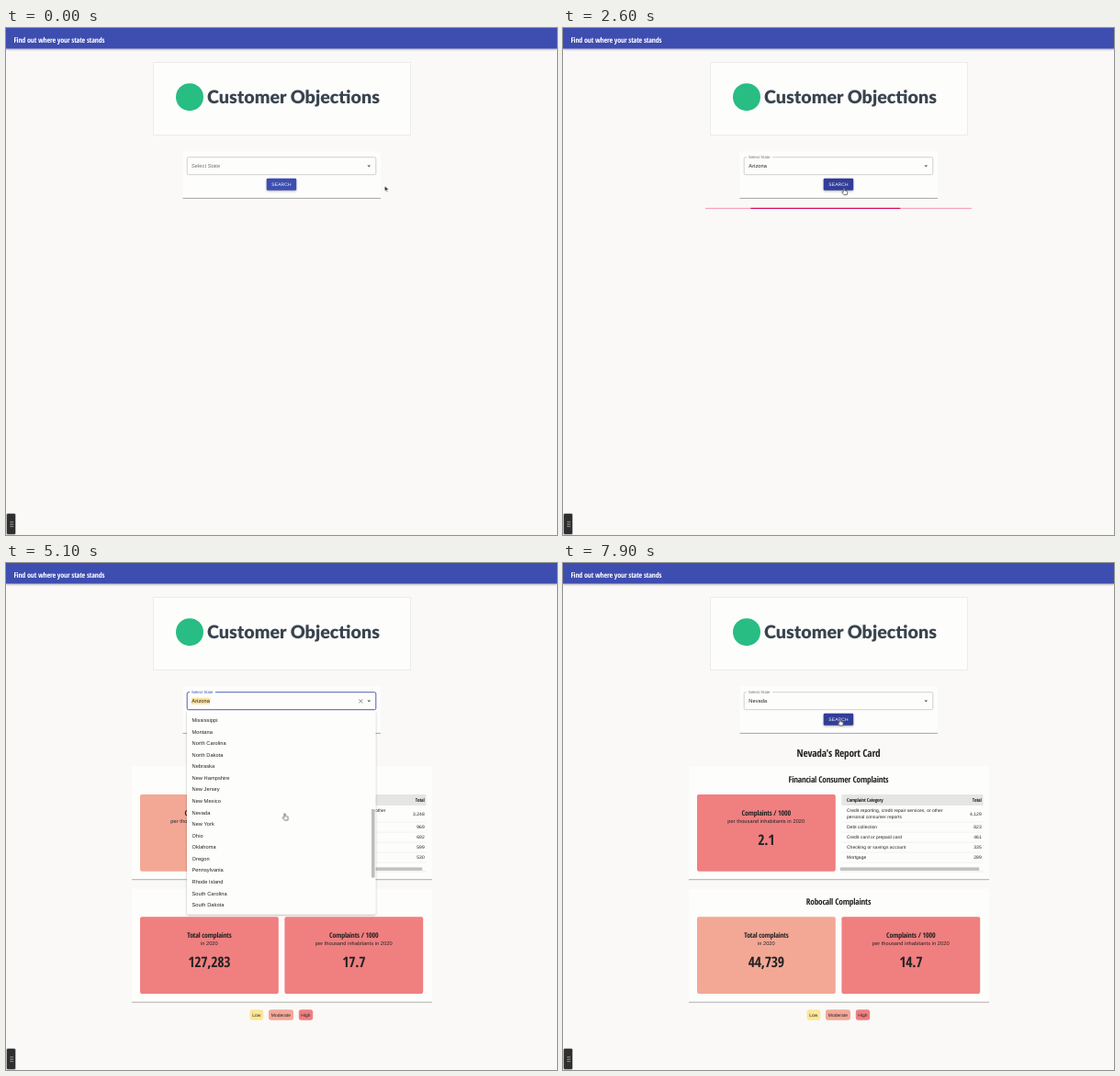
An HTML page for the animation above (8000 ms loop, 600x552 px).

```html
<!DOCTYPE html>
<html lang="en">
<head>
<meta charset="utf-8">
<title>State report card</title>
<style>
:root { --k: 1; --blue: #3d4db0; }
html, body { margin: 0; width: 100%; height: 100%; overflow: hidden; background: #faf9f8; }
svg { display: block; }
text { font: 5.66px "Liberation Sans", Arial, sans-serif; letter-spacing: .01em; fill: #222; text-rendering: geometricPrecision; }
.small { font-size: 4.95px; }
.tiny { font-size: 4.25px; }
.mid { text-anchor: middle; }
.end { text-anchor: end; }
.brand { font: 900 19.7px Lato, sans-serif; letter-spacing: 0; fill: #39444f; }

/* Narrow headings; --k evens out the widths of the available faces */
.thin, .head {
  font-family: Oswald, "Open Sans Condensed", "Roboto Condensed", "Open Sans", sans-serif;
  font-stretch: 75%; font-weight: 300; letter-spacing: -.02em;
  font-size: calc(var(--size) * var(--k));
}
.head { font-weight: 400; }

/* Visibility of the parts over one loop */
.empty, .idle, .focus, .clear, .caret, .marked, .first, .second, .menu, .resultA, .resultB, .load,
.arrow, .hand, .beam { animation: 8s step-end infinite; }
.empty { animation-name: empty; }
.idle { animation-name: idle; }
.focus { animation-name: focus; }
.clear { animation-name: clear; }
.caret { animation-name: caret; }
.marked { animation-name: marked; }
.first { animation-name: first; }
.second { animation-name: second; }
.menu { animation-name: menu; }
.resultA { animation-name: resultA; }
.resultB { animation-name: resultB; }
.load { animation-name: load; animation-delay: var(--at); }
.arrow { animation-name: arrow; }
.hand { animation-name: hand; }
.beam { animation-name: beam; }
@keyframes empty { 0% { visibility: visible } 7.5%, 100% { visibility: hidden } }
@keyframes idle { 0%, 48.75% { visibility: hidden } 26.875%, 88.125%, 100% { visibility: visible } }
@keyframes focus { 0%, 26.875%, 88.125%, 100% { visibility: hidden } 7.5%, 48.75% { visibility: visible } }
@keyframes clear { 0%, 26.875%, 88.125%, 100% { visibility: hidden } 20%, 48.75% { visibility: visible } }
@keyframes caret { 0%, 26.875%, 88.125%, 100% { visibility: hidden } 20%, 70% { visibility: visible } }
@keyframes marked { 0%, 70%, 100% { visibility: hidden } 48.75% { visibility: visible } }
@keyframes first { 0%, 70%, 100% { visibility: hidden } 20% { visibility: visible } }
@keyframes second { 0% { visibility: hidden } 70%, 100% { visibility: visible } }
@keyframes menu { 0%, 20%, 70%, 100% { visibility: hidden } 7.5%, 48.75% { visibility: visible } }
@keyframes resultA { 0%, 88.125%, 100% { visibility: hidden } 33.125% { visibility: visible } }
@keyframes resultB { 0% { visibility: hidden } 96.25%, 100% { visibility: visible } }
@keyframes load { 0% { visibility: visible } 8.125%, 100% { visibility: hidden } }
@keyframes arrow { 0%, 37%, 70.5% { visibility: visible } 4%, 46.5%, 76.8%, 100% { visibility: hidden } }
@keyframes hand { 0%, 37%, 70.5% { visibility: hidden } 4%, 46.5%, 78.6%, 100% { visibility: visible } }
@keyframes beam { 0%, 78.6%, 100% { visibility: hidden } 76.8% { visibility: visible } }

/* Motion */
.bar { animation: bar 8s infinite; animation-delay: var(--at); }
@keyframes bar {
  0% { x: -101.5px; width: 101.5px; animation-timing-function: cubic-bezier(.65, .815, .735, .395) }
  15.75%, 100% { x: 290px; width: 261px }
}
.rows { animation: rows 8s infinite; }
.thumb { animation: thumb 8s infinite; }
@keyframes rows { 0%, 56.25% { transform: none } 62.5%, 100% { transform: translateY(-316px) } }
@keyframes thumb { 0%, 56.25% { transform: none } 62.5%, 100% { transform: translateY(105px) } }
.button { fill: var(--blue); animation: button 8s linear infinite; }
@keyframes button {
  0%, 25.5%, 38%, 79% { fill: #3d4db0 }
  28.5%, 36%, 82%, 100% { fill: #303d98 }
}
.pointer { animation: pointer 8s ease-in-out infinite; }
@keyframes pointer {
  0%, 1.25% { transform: translate(412.5px, 172px) }
  5%, 9% { transform: translate(395px, 150px) }
  16.25%, 20% { transform: translate(319px, 210px) }
  23.75%, 36% { transform: translate(306px, 174px) }
  43.75%, 45% { transform: translate(388px, 164px) }
  47.5%, 50% { transform: translate(395px, 150px) }
  55%, 72.5% { transform: translate(303.5px, 272.5px) }
  77.5% { transform: translate(300px, 194.5px) }
  80%, 100% { transform: translate(301.5px, 169.5px) }
}
</style>
</head>
<body>
<svg id="stage" width="600" height="552" viewBox="0 0 600 552">
  <defs>
    <filter id="shade" x="-10%" y="-10%" width="120%" height="130%">
      <feDropShadow dx="0" dy="1" stdDeviation="1.2" flood-opacity=".3"/>
    </filter>
    <clipPath id="view"><rect x="197" y="162" width="205" height="220"/></clipPath>
  </defs>

  <rect width="600" height="22.5" fill="var(--blue)" filter="url(#shade)"/>
  <text id="probe" class="thin" style="--size:9.8px;fill:#fff" x="8.5" y="15.6">Find out where your state stands</text>

  <rect x="160.5" y="37.5" width="280" height="79" fill="#fdfdfc" stroke="#ececea"/>
  <circle cx="200" cy="75.2" r="15" fill="#28bd83"/>
  <text class="brand" x="219" y="82.2">Customer Objections</text>

  <rect x="192.5" y="134.5" width="215.5" height="51" fill="#fdfdfc"/>
  <path d="M192.5 185.4H408" stroke="#9c9c9c" stroke-width=".9"/>
  <rect class="button" x="283.7" y="163.8" width="32.5" height="13" rx="1.4" filter="url(#shade)"/>
  <text class="small mid" style="fill:#fff;letter-spacing:.0286em" x="300" y="171.8">SEARCH</text>

  <g id="results"></g>
  <g id="loaders"></g>

  <g class="menu">
    <rect x="197" y="161" width="205.5" height="221.5" rx="1.4" fill="#fdfdfc" filter="url(#shade)"/>
    <g clip-path="url(#view)"><g class="rows" id="rows"></g></g>
    <rect class="thumb" x="398" y="163" width="3.6" height="74.5" fill="#bdbdbd"/>
  </g>

  <g fill="none" stroke-width=".7">
    <rect class="empty" x="197.2" y="140.7" width="205.6" height="19" rx="1.4" stroke="#bdbdbd"/>
    <path class="idle" id="outline" stroke="#bdbdbd" d="M200 140.7H198.6Q197.2 140.7 197.2 142.1V158.3Q197.2 159.7 198.6 159.7H401.4Q402.8 159.7 402.8 158.3V142.1Q402.8 140.7 401.4 140.7H228"/>
  </g>
  <use class="focus" href="#ring"/>
  <text class="empty" style="fill:#707070" x="202" y="152.1">Select State</text>
  <text class="idle tiny" style="fill:#707070" x="202" y="142.2">Select State</text>
  <text class="focus tiny" style="fill:var(--blue)" x="202" y="142.2">Select State</text>
  <rect class="marked" x="202" y="146.8" width="20.3" height="7" fill="#fbe3a0"/>
  <text class="first" x="202.3" y="152.2">Arizona</text>
  <text class="second" x="202.3" y="152.2">Nevada</text>
  <path class="caret" d="M222.1 147V153.4" stroke="#222" stroke-width=".6"/>
  <path class="clear" d="M384.3 148.4l4 4m0-4l-4 4" stroke="#555" stroke-width=".7"/>
  <path d="M393.4 149.5h3.7l-1.85 1.9z" fill="#555"/>

  <rect x=".5" y="528.5" width="10" height="23" rx="1.5" fill="#2f2f2f" stroke="#d5d5d5" stroke-width=".6"/>
  <path d="M5.3 537.4v6M7.2 537.4v6" stroke="#eee" stroke-width="1" stroke-dasharray="1 1.4"/>

  <g class="pointer">
    <path class="arrow" d="M0 0V5.6L1.3 4.4 2.2 6.4 3.1 6 2.2 4.1H4z" fill="#111" stroke="#fff" stroke-width=".5"/>
    <path class="hand" d="M-.7 .7Q0-.4 .7 .7V3L3.2 3.6Q4 4 3.8 5L3.3 7.6H-.2L-2.4 4.8Q-2.2 3.8-.7 4.7z" fill="#fff" stroke="#222" stroke-width=".6"/>
    <path class="beam" d="M-1 0Q0 0 0 .7 0 0 1 0M0 .7V5.3M-1 6Q0 6 0 5.3 0 6 1 6" fill="none" stroke="#555" stroke-width=".5"/>
  </g>
</svg>
<script>
const $ = id => document.getElementById(id);
const text = (x, y, cls, str, size) =>
  `<text class="${cls}" x="${x}" y="${y}"${size ? ` style="--size:${size}px"` : ''}>${str}</text>`;
const box = (x, y, w, h, fill, r = 0) =>
  `<rect x="${x}" y="${y}" width="${w}" height="${h}" rx="${r}" fill="${fill}"/>`;
const line = (x, y, w, color, weight = .5) =>
  `<path d="M${x} ${y}h${w}" stroke="${color}" stroke-width="${weight}"/>`;

const LOW = '#fbe795', MODERATE = '#f3a896', HIGH = '#f07f80';
const PER = 'per thousand inhabitants in 2020';

function card(x, y, fill, title, note, value) {
  const cx = x + 75.3;
  return box(x, y, 150.8, 83.8, fill, 2) +
    text(cx, y + 22.8, 'thin mid', title, 9.6) +
    text(cx, y + 31, 'mid', note) +
    text(cx, y + 55, 'head mid', value, 19.3);
}

function panel(y, title) {
  return box(137, y, 327, 123.5, '#fdfdfc') + line(137, y + 123.4, 327, '#a5a5a5', .9) +
    text(300, y + 17.6, 'thin mid', title, 11.4);
}

function table(rows) {
  let out = box(303.5, 252, 154, 12, '#e5e5e3') +
    text(309, 260.4, 'head', 'Complaint Category', 6.6) +
    text(455.7, 260.4, 'head end', 'Total', 6.6) +
    text(309, 271.2, 'small', 'Credit reporting, credit repair services, or other') +
    text(309, 278.4, 'small', 'personal consumer reports');
  rows.forEach(([name, total], i) => {
    const y = 278.2 + 11 * i;
    out += text(455.7, i ? y : 274.8, 'small end', total) +
      (i ? text(309, y, 'small', name) : '') + line(303.5, y + 4, 154, '#e6e6e4');
  });
  return out + box(301.8, 331.4, 151.5, 3.5, '#c1c1c1') + line(301.8, 336, 156, '#dadada');
}

function chip(x, w, fill, label) {
  return box(x, 486.3, w, 11.5, fill, 2.8) + text(x + w / 2, 493.8, 'small mid', label);
}

function report(d) {
  return `<g class="${d.cls}">` + text(300, 211, 'head mid', `${d.state}'s Report Card`, 13.8) +
    panel(221.3, 'Financial Consumer Complaints') +
    card(146, 252, d.colors[0], 'Complaints / 1000', PER, d.values[0]) + table(d.rows) +
    panel(354.8, 'Robocall Complaints') +
    card(146, 385.3, d.colors[1], 'Total complaints', 'in 2020', d.values[1]) +
    card(303.4, 385.3, HIGH, 'Complaints / 1000', PER, d.values[2]) +
    chip(265.6, 14.6, LOW, 'Low') + chip(285.9, 27.1, MODERATE, 'Moderate') +
    chip(318.8, 15.4, HIGH, 'High') + '</g>';
}

const DEBT = 'Debt collection', CREDIT = 'Credit card or prepaid card',
  HOME = 'Mortgage', BANK = 'Checking or savings account';
$('results').innerHTML = report({
  cls: 'resultA', state: 'Arizona', colors: [MODERATE, HIGH], values: ['0.9', '127,283', '17.7'],
  rows: [['', '3,248'], [DEBT, '969'], [CREDIT, '692'], [HOME, '599'], [BANK, '530']]
}) + report({
  cls: 'resultB', state: 'Nevada', colors: [HIGH, MODERATE], values: ['2.1', '44,739', '14.7'],
  rows: [['', '4,129'], [DEBT, '823'], [CREDIT, '461'], [BANK, '335'], [HOME, '289']]
});

// Each loader runs on the same 8 s cycle, shifted to its search click
$('loaders').innerHTML = [2150, 7050].map(start =>
  `<svg class="load" style="--at:${start - 8000}ms" x="155" y="195.6" width="290" height="1.5">
    <rect width="290" height="2" fill="#f6a3bd"/><rect class="bar" height="2" fill="#d0105a"/></svg>`).join('');

const states = `Alaska,Alabama,Arkansas,Arizona,California,Colorado,Connecticut,District of Columbia,
Delaware,Florida,Georgia,Hawaii,Iowa,Idaho,Illinois,Indiana,Kansas,Kentucky,Louisiana,Massachusetts,
Maryland,Maine,Michigan,Minnesota,Missouri,Mississippi,Montana,North Carolina,North Dakota,Nebraska,
New Hampshire,New Jersey,New Mexico,Nevada,New York,Ohio,Oklahoma,Oregon,Pennsylvania,Rhode Island,
South Carolina,South Dakota,Tennessee,Texas,Utah,Virginia,Vermont,Washington,Wisconsin,West Virginia,
Wyoming`.split(/,\s*/);
$('rows').innerHTML = states.map((name, i) => text(202.5, 174.7 + 12.57 * i, '', name)).join('');

// The focused outline shares the idle shape
const ring = $('outline').cloneNode();
ring.setAttribute('class', 'focus');
ring.setAttribute('stroke', '#3d4db0');
ring.setAttribute('stroke-width', '.9');
ring.id = 'ring';
$('outline').after(ring);
document.querySelector('use').remove();

const scale = 99 / $('probe').getComputedTextLength();
document.documentElement.style.setProperty('--k', Math.max(.72, Math.min(1.1, scale)));
</script>
</body>
</html>
```
